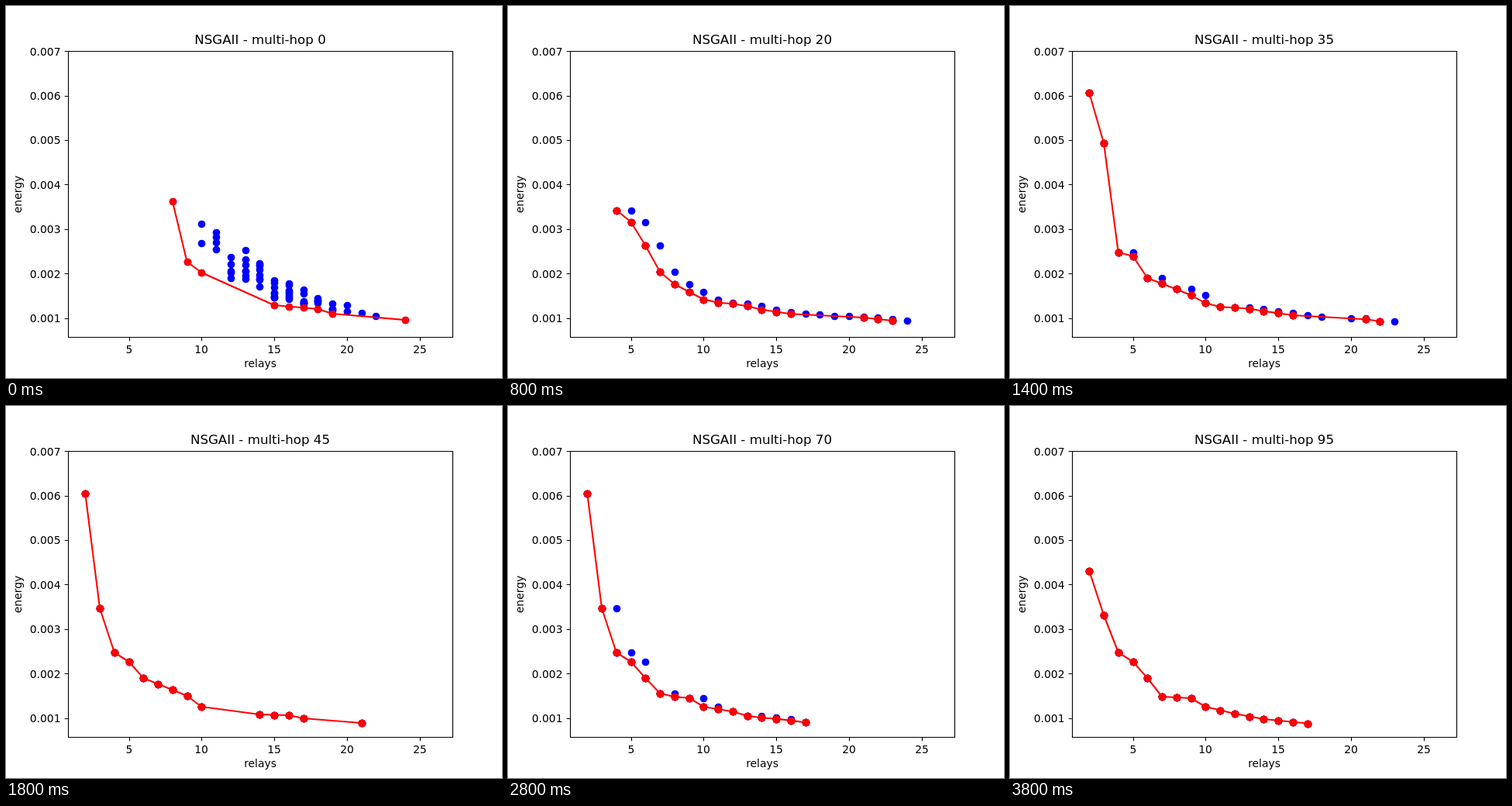
An HTML page for the animation above (4 s loop, 640 by 480 pixels).

```html
<!DOCTYPE html>
<html lang="en">
<head>
<meta charset="utf-8">
<title>Pareto front</title>
<style>
  html, body { margin: 0; width: 100%; height: 100%; overflow: hidden; background: #fff; }
  svg { display: block; width: 640px; height: 480px; }
  text { font: 13.89px "DejaVu Sans", sans-serif; fill: #000; text-anchor: middle; }
  .title { font-size: 16.67px; }
  .tick { text-anchor: end; }
  .axis { fill: none; stroke: #000; stroke-width: 1.11; }
  .front { fill: none; stroke: #f00; stroke-width: 2.08; stroke-linejoin: round; }
</style>
</head>
<body>
<svg viewBox="0 0 640 480">
  <g id="population" fill="#00f"></g>
  <polyline id="line" class="front"/>
  <g id="best" fill="#f00"></g>
  <path id="axes" class="axis"/>
  <g id="labels"></g>
  <text id="title" class="title" x="328" y="49"></text>
  <text x="328" y="466">relays</text>
  <text transform="translate(20 243) rotate(-90)">energy</text>
</svg>
<script>
const STEP_MS = 200, STEPS = 20, GENERATIONS_PER_STEP = 5;
const get = id => document.getElementById(id);
const lerp = (a, b, k) => a + (b - a) * k;
const plotX = relays => 64.8 + 18.75 * relays;
const plotY = energy => 402.6 - 57.4 * (energy - 1);
const snap = v => Math.round(v) + 0.5;
const range = (lo, hi) => Array.from({ length: hi - lo + 1 }, (_, i) => lo + i);

function randomFrom(seed) {
  return () => {
    const v = Math.sin(++seed * 12.9898) * 43758.5453;
    return v - Math.floor(v);
  };
}

// Corners of the front as [relays, pixel row]; the curve is straight in between.
const head = [[2, 113], [3, 261], [4, 318], [5, 330], [6, 351]];
const tail = [[7, 375], [9, 377], [10, 388], [12, 397], [14, 404], [17, 409.5]];
const settled = [...head, ...tail];

// waste: share of solutions that spend one relay too many.
const keys = [
  { gen: 0, waste: 0, front: [[8, 252], [9, 330], [10, 344], [15, 386], [18, 391], [19, 397], [24, 405]] },
  { gen: 10, waste: 1, front: [[5, 238], [6, 267], [7, 328], [8, 353], [10, 376], [12, 381], [14, 392], [18, 399], [24, 405]] },
  { gen: 30, waste: 1, front: [[2, 112], [3, 135], [4, 318], [5, 319], [6, 351], [8, 365], [10, 381], [11, 387], [13, 388], [16, 399], [21, 402], [22, 405]] },
  { gen: 45, waste: 0, front: [...head, [9, 374], [10, 388], [14, 398], [16, 399], [17, 403], [21, 409]] },
  { gen: 60, waste: 1, front: [...head, [8, 374], [9, 376], [10, 388], [12, 389], [13, 398], [15, 399], [18, 409]] },
  { gen: 75, waste: 0, front: settled },
  { gen: 85, waste: 0, front: settled },
  { gen: 90, waste: 0, front: [[2, 213], [3, 270], ...head.slice(2), ...tail] }
];

function segmentAt(front, x) {
  const i = front.findIndex(corner => corner[0] >= x);
  const end = i < 0 ? front.length - 1 : Math.max(1, i);
  return [front[end - 1], front[end]];
}

function rowAt(front, x) {
  const [[x0, y0], [x1, y1]] = segmentAt(front, x);
  return lerp(y0, y1, (x - x0) / (x1 - x0));
}

// Short segments hold a solution at every relay count, long ones only at their ends.
function hasSolution(front, x) {
  const [[x0], [x1]] = segmentAt(front, x);
  return x1 - x0 <= 3 || x === x0 || x === x1;
}

function populationAt(gen) {
  const next = keys.findIndex(key => key.gen > gen);
  const b = keys[next < 0 ? keys.length - 1 : next];
  const a = next < 0 ? b : keys[next - 1];
  const k = a === b ? 0 : (gen - a.gen) / (b.gen - a.gen);
  const nearest = k < 0.5 ? a.front : b.front;
  const bound = i => Math.round(lerp(a.front.at(i)[0], b.front.at(i)[0], k));
  const lo = bound(0), hi = bound(-1);
  const row = x => lerp(rowAt(a.front, x), rowAt(b.front, x), k);

  const all = range(lo, hi);
  const front = all.filter(x => x === lo || x === hi || hasSolution(nearest, x)).map(x => [x, row(x)]);

  const random = randomFrom(gen);
  const waste = lerp(a.waste, b.waste, k);
  const dominated = all.filter(() => random() < waste).map(x => [x + 1, row(x)]);

  // The initial random cloud thins out over the first generations.
  const cloud = Math.max(0, 1 - gen / 10);
  for (const x of range(10, 23)) {
    const count = Math.round(8 * cloud * Math.exp(-(((x - 15) / 4.5) ** 2)));
    const reach = 90 * Math.exp((10 - x) / 6);
    for (let n = 0; n < count; n++) dominated.push([x, row(x) - reach * lerp(0.15, 1, random())]);
  }
  return { front, dominated };
}

const dots = points => points
  .map(([x, y]) => `<circle cx="${snap(plotX(x))}" cy="${snap(y)}" r="4.86"/>`).join("");

function drawAxes() {
  let path = "M80.5 58.5H576.5V427.5H80.5Z";
  let labels = "";
  for (let relays = 5; relays <= 25; relays += 5) {
    const x = plotX(relays);
    path += `M${snap(x)} 427.5v4.86`;
    labels += `<text x="${Math.round(x)}" y="448">${relays}</text>`;
  }
  for (let energy = 1; energy <= 7; energy++) {
    const y = plotY(energy);
    path += `M80.5 ${snap(y)}h-4.86`;
    labels += `<text class="tick" x="70.5" y="${Math.round(y + 5.4)}">0.00${energy}</text>`;
  }
  get("axes").setAttribute("d", path);
  get("labels").innerHTML = labels;
}

let shown = -1;
function render(time) {
  const step = Math.floor(time / STEP_MS) % STEPS;
  if (step === shown) return;
  shown = step;
  const gen = step * GENERATIONS_PER_STEP;
  const { front, dominated } = populationAt(gen);
  // Identical solutions pile up as the population converges.
  const best = dots(front).repeat(Math.min(4, 1 + Math.floor(gen / 10)));
  get("population").innerHTML = dots(dominated) + best;
  get("best").innerHTML = best;
  get("line").setAttribute("points", front.map(([x, y]) => `${plotX(x)},${y}`).join(" "));
  get("title").textContent = `NSGAII - multi-hop ${gen}`;
}

drawAxes();
const start = performance.now();
function loop() {
  render(performance.now() - start);
  requestAnimationFrame(loop);
}
loop();
</script>
</body>
</html>
```
